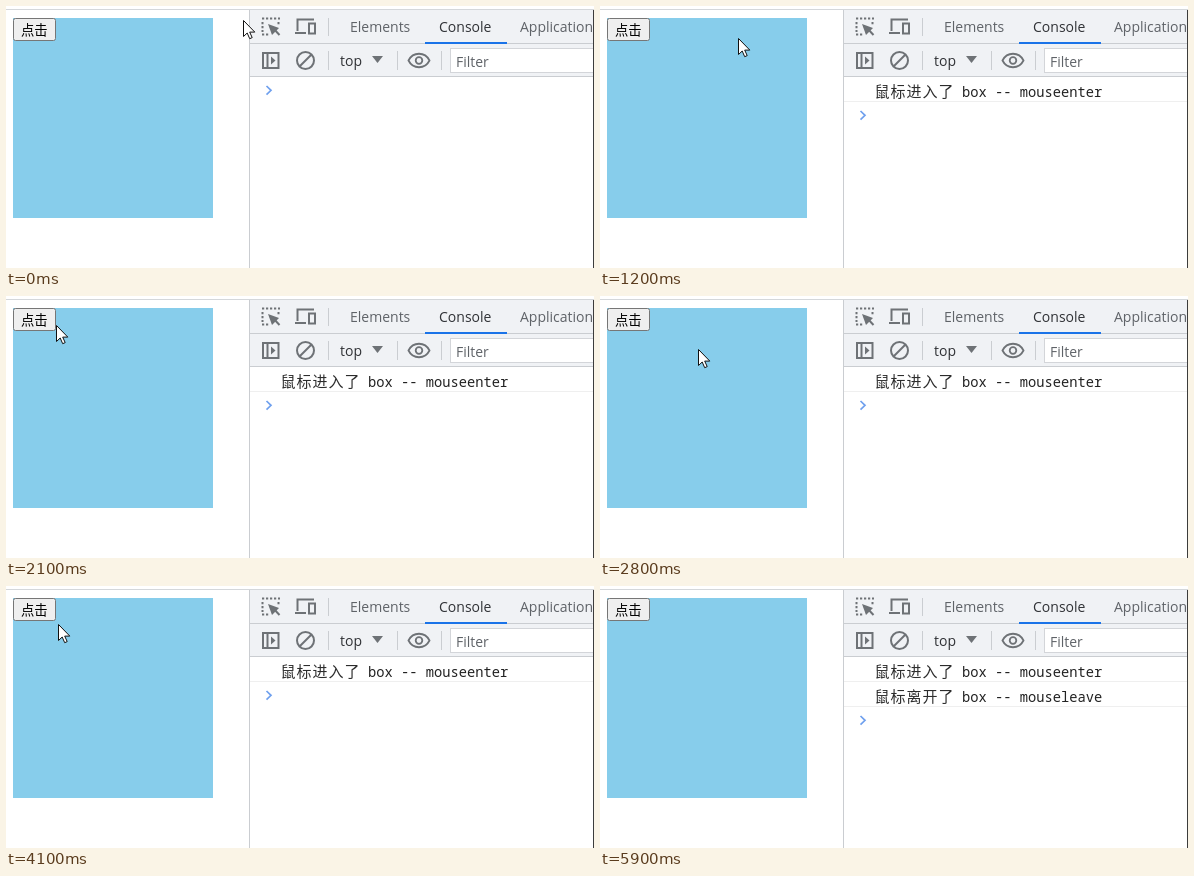
An HTML page that plays this animation: 588x262 px, repeating every 6.5 s.

```html
<!DOCTYPE html>
<html lang="zh-CN">
<head>
<meta charset="utf-8">
<title>mouseenter / mouseleave</title>
<style>
  html, body { margin: 0; width: 100%; height: 100%; overflow: hidden; background: #fff; }
  svg { display: block; width: 588px; height: 262px; }
  text { white-space: pre; }
  .ui { font: 14px "Open Sans", sans-serif; fill: #5f6368; }
  .ui .dark { fill: #303236; }
  .cjk { font: 300 15px "Noto Sans CJK SC", "Noto Sans CJK", sans-serif; letter-spacing: 1px; fill: #2c2c2c; }
  .mono { font: 13.75px "Noto Sans Mono", monospace; fill: #222; }
  .icon { fill: none; stroke: #6e7276; stroke-width: 2; }
  .solid { fill: #6e7276; stroke: none; }
  .line { fill: #cacdd1; }
  #button rect { fill: #efefef; stroke: #767676; }
  #button.hover rect { fill: #e5e5e5; stroke: #4f4f4f; }
  #button text { font: 13.33px "Noto Sans CJK SC", "Noto Sans CJK", sans-serif; }
</style>
</head>
<body>
<svg viewBox="0 0 588 262">
  <rect class="line" y="3" width="588" height="1" fill-opacity=".8"/>

  <rect x="7" y="12" width="200" height="200" fill="#87cdeb"/>
  <g id="button">
    <rect x="7.5" y="12.5" width="42" height="22" rx="2"/>
    <text x="15" y="29">点击</text>
  </g>

  <!-- panel bars -->
  <rect x="244" y="4" width="344" height="67" fill="#f0f2f5"/>
  <path class="line" d="M243 4h1v258h-1zM244 37h344v1H244zM244 70h344v1H244z"/>
  <rect x="419" y="36" width="82" height="2" fill="#1a73e8"/>
  <path class="line" d="M322 12h1v18h-1zM322 45h1v19h-1zM391 45h1v19h-1zM435 45h1v19h-1z"/>
  <rect x="444.5" y="42.5" width="150" height="24" fill="#fff" stroke="#d3d5d9"/>

  <!-- tab icons -->
  <g class="icon">
    <path d="M256 12.5h18M256 28.5h8M256.5 16v10M272.5 16v4" stroke-dasharray="2.2 1.8"/>
    <path d="M267 22l6.5 7"/>
    <path class="solid" d="M262 18l11 4-7 7z"/>
    <path d="M291.5 25V13.5H308M289 27h11"/>
    <rect x="303" y="17.5" width="6" height="10"/>
  </g>

  <!-- toolbar icons -->
  <g class="icon">
    <rect x="257" y="47" width="15.5" height="15"/>
    <path d="M261.5 47v15"/>
    <path class="solid" d="M265 50.5l4.5 4-4.5 4z"/>
    <circle cx="299.5" cy="54.5" r="8.5"/>
    <path d="M293.5 60.5l12-12"/>
    <path class="solid" d="M366 50h11l-5.500 7z"/>
    <path d="M402.5 54.5c4.5-9 16.5-9 21 0c-4.5 9-16.5 9-21 0z" stroke-width="1.8"/>
    <circle cx="413" cy="54.5" r="3.3" stroke-width="1.8"/>
  </g>

  <g class="ui">
    <text x="344" y="26">Elements</text>
    <text class="dark" x="433" y="26">Console</text>
    <text x="514" y="26">Application</text>
    <text class="dark" x="334" y="60">top</text>
    <text x="450" y="61">Filter</text>
  </g>

  <!-- console -->
  <g id="entered">
    <text class="cjk" x="274.5" y="90.5">鼠标进入了</text>
    <text class="mono" x="362" y="90.5">box -- mouseenter</text>
    <rect x="244" y="95" width="343" height="1" fill="#efefef"/>
  </g>
  <g id="left" transform="translate(0 25)">
    <text class="cjk" x="274.5" y="90.5">鼠标离开了</text>
    <text class="mono" x="362" y="90.5">box -- mouseleave</text>
    <rect x="244" y="95" width="343" height="1" fill="#efefef"/>
  </g>
  <path id="prompt" d="M260.5 80l4.500 4.300-4.500 4.300" fill="none" stroke="#6fa0ee" stroke-width="1.7"/>
  <rect x="587" y="4" width="1" height="258" fill="#3c3c3c"/>

  <path id="cursor" d="M.5 .5v16l3.700-3.500 2.500 5.700 2.500-1.100-2.500-5.500h5.100z" fill="#fff" stroke="#111"/>
</svg>
<script>
  const LOOP = 6500, STEP = 100, ROW = 25;
  const ENTER = 7, LEAVE = 50, GONE = 59;

  const byId = id => document.getElementById(id);
  const [button, entered, left, prompt, cursor] =
    ["button", "entered", "left", "prompt", "cursor"].map(byId);
  const show = (el, on) => el.setAttribute("visibility", on ? "visible" : "hidden");
  const place = (el, x, y) => el.setAttribute("transform", `translate(${x} ${y})`);
  const ease = k => k ** 1.26;

  // The pointer rests between glides; each glide runs from one step to another.
  function pointerAt(step) {
    let x = 237, y = 14;
    const glide = (from, to, endX, endY) => {
      const k = ease(Math.min(1, Math.max(0, (step - from) / (to - from))));
      x += (endX - x) * k;
      y += (endY - y) * k;
    };
    glide(3, 10, 156, 31);
    glide(10, 17, 70, 36);
    glide(17, 23, 36, 25);
    glide(25, 28, 98, 53);
    glide(28, 33, 36, 25);
    glide(37, 39, 57, 43);
    glide(40, 42, 44, 31);
    glide(45, 49, 204, 48);
    glide(49, 52, 242, 58);
    glide(56, 58, 284, 169);
    return [Math.round(x), Math.round(y)];
  }

  function draw(time) {
    const step = Math.floor(time % LOOP / STEP);
    const [x, y] = pointerAt(step);
    place(cursor, x, y);
    show(cursor, step < GONE);
    button.classList.toggle("hover", x >= 7 && x < 50 && y >= 12 && y < 35);
    show(entered, step >= ENTER);
    show(left, step >= LEAVE);
    place(prompt, 0, ROW * ((step >= ENTER) + (step >= LEAVE)));
  }

  const start = performance.now();
  function tick() {
    draw(performance.now() - start);
    requestAnimationFrame(tick);
  }
  tick();
</script>
</body>
</html>
```
